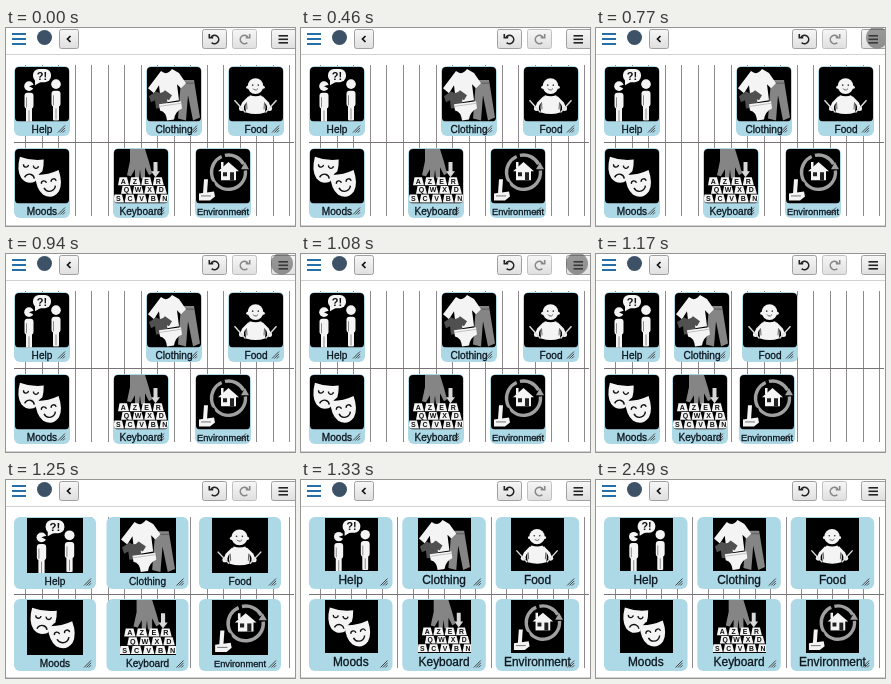
Animation, 289 px wide and 198 px high, one loop 3270 ms. Source, as an HTML page with a canvas:

```html
<!DOCTYPE html>
<html lang="en">
<head>
<meta charset="utf-8">
<title>Communication grid</title>
<style>
html, body { margin: 0; width: 100%; height: 100%; overflow: hidden; background: #fff; }
canvas { display: block; width: 289px; height: 198px; }
</style>
</head>
<body>
<canvas id="stage" width="289" height="198"></canvas>
<script>
const ctx = document.getElementById('stage').getContext('2d');
const LOOP = 3270, TAU = Math.PI * 2;
const FONT = '"Liberation Sans", Arial, sans-serif';
const WHITE = '#f4f4f4', GRAY = '#858585', DARK = '#505050', INK = '#0c1720';

// Layout states: card lefts per row, card box, picture size, label size, grid columns
const small = {
  at: 0, top: [8, 140, 222], low: [8, 107, 189], y: 38, w: 56, h: 70,
  pic: 54, picH: 54.5, font: 10.1, fit: .92, base: 67, cols: 17
};
const even = [8, 101.3, 194.7];
const poses = [
  small,
  { ...small, at: 770, touch: 281 },
  { ...small, at: 940, touch: 276 },
  { ...small, at: 1170, top: [8, 78, 146], low: [8, 76, 143] },
  { ...small, at: 1250, top: [8, 100.5, 193], low: [8, 100.5, 193], y: 37, w: 82, h: 72, pic: 56, picH: 55, base: 68 },
  { at: 1330, top: even, low: even, y: 37, w: 83.5, h: 72, pic: 53, picH: 53, font: 11.9, fit: 1, base: 67, cols: 18 }
];

function poly(points, fill) {
  ctx.beginPath();
  points.forEach(([x, y]) => ctx.lineTo(x, y));
  ctx.closePath();
  ctx.fillStyle = fill;
  ctx.fill();
}
function line(points, color, width = 1) {
  ctx.beginPath();
  points.forEach(([x, y]) => ctx.lineTo(x, y));
  ctx.strokeStyle = color;
  ctx.lineWidth = width;
  ctx.stroke();
}
function disc(x, y, r, fill) {
  ctx.beginPath();
  ctx.arc(x, y, r, 0, TAU);
  ctx.fillStyle = fill;
  ctx.fill();
}
function arc(x, y, r, a, b, color, width) {
  ctx.beginPath();
  ctx.arc(x, y, r, a, b);
  ctx.strokeStyle = color;
  ctx.lineWidth = width;
  ctx.stroke();
}
function box(x, y, w, h, r, fill, stroke) {
  ctx.beginPath();
  ctx.roundRect(x, y, w, h, r);
  ctx.fillStyle = fill;
  ctx.fill();
  if (stroke) {
    ctx.strokeStyle = stroke;
    ctx.lineWidth = 1;
    ctx.stroke();
  }
}
function label(text, x, y, size, weight = 'bold', color = '#111') {
  ctx.font = `${weight} ${size}px ${FONT}`;
  ctx.textAlign = 'center';
  ctx.fillStyle = color;
  ctx.fillText(text, x, y);
}
function shape(path, fill) {
  ctx.fillStyle = fill;
  ctx.fill(new Path2D(path));
}

// Pictograms on a 54 x 54 field
function person(x, y) {
  disc(x, y, 4.8, WHITE);
  box(x - 4.5, y + 6.5, 9, 16, 3, WHITE);
  box(x - 3, y + 18, 6, 18, 1, WHITE);
  line([[x - 2.5, y + 11], [x - 2.5, y + 21]], '#444', .6);
  line([[x, y + 24], [x, y + 35]], '#444', .6);
}
function help() {
  person(14, 19);
  poly([[14, 19], [20, 17], [20, 22]], '#000');
  person(41, 17);
  box(18, 2, 18, 13, 6, WHITE);
  poly([[20, 12], [27, 14], [20, 18]], WHITE);
  label('?!', 27, 12.5, 11);
}

function clothing() {
  poly([[34, 13], [47, 13], [53, 50], [46, 53], [41, 28], [39, 53], [31, 51]], GRAY);
  line([[34, 16], [47, 16]], DARK, .8);
  shape('M14 4 Q20 9 25 2 L32 6 L39 16 L34 21 L30 17 L32 33 L14 36 L12 18 L7 26 L1 21 Z', WHITE);
  shape('M9 24 Q14 28 18 23 L25 28 L22 33 L20 32 L21 40 L9 41 L8 33 L4 35 L2 29 Z', DARK);
  shape('M12 37 L34 34 L35 41 Q28 44 27 52 L20 53 Q19 44 13 43 Z', WHITE);
  line([[12.5, 39], [34, 36]], '#aaa', .7);
}

function food() {
  disc(26.5, 19, 7.8, WHITE);
  disc(18.7, 20, 1.5, WHITE);
  disc(34.3, 20, 1.5, WHITE);
  disc(23.7, 18, .8, '#333');
  disc(29.3, 18, .8, '#333');
  arc(26.5, 20, 2.8, .5, 2.6, '#444', .8);
  shape('M21 28 Q27 30 32 28 Q38 34 36 45 Q27 48 17 45 Q15 34 21 28 Z', WHITE);
  for (const s of [-1, 1]) {
    const at = (dx, y) => [26.5 + s * dx, y];
    line([at(6, 30), at(12, 36), at(14, 41)], WHITE, 3.2);
    disc(...at(14, 41), 2.5, WHITE);
    line([at(10, 45), at(21, 33)], '#ddd', 1.4);
    line([at(9, 35), at(8.5, 42)], '#444', .8);
  }
}

function mask(x, y, tilt, happy) {
  ctx.save();
  ctx.translate(x, y);
  ctx.rotate(tilt);
  shape('M-12 -11 Q0 -8 12 -11 Q14 3 8 10 Q0 17 -8 10 Q-14 3 -12 -11 Z', WHITE);
  for (const s of [-1, 1]) {
    if (happy) arc(s * 5, -1, 2.5, Math.PI, TAU, '#111', 1.3);
    else arc(s * 5, -4, 2.5, 0, Math.PI, '#111', 1.3);
  }
  if (happy) arc(0, 2, 6, .25, Math.PI - .25, '#111', 1.4);
  else arc(0, 10, 5, Math.PI + .25, TAU - .25, '#111', 1.4);
  ctx.restore();
}
function moods() {
  mask(15.5, 20, .12, false);
  disc(34, 34, 13.5, '#000');
  mask(34, 34, -.2, true);
}

function keyboard() {
  shape('M16 0 L31 0 L35 13 L38 24 L35 26 L31 18 L31 29 L27 29 L26 20 L25 30 L21 30 L21 20 L17 27 L13 26 L16 12 Z', GRAY);
  line([[41.5, 13], [41.5, 23]], '#d8d8d8', 4);
  poly([[37, 22], [46, 22], [41.5, 28]], '#d8d8d8');
  ['AZER', 'QWXD', 'SCVBN'].forEach((row, r) => {
    const y = 28 + r * 8.6, step = 11.6;
    [...row].forEach((ch, i) => {
      const x = [4, 7, -1][r] + i * step;
      poly([[x + 1.5, y], [x + 9, y], [x + 11, y + 7.8], [x, y + 7.8]], WHITE);
      label(ch, x + 5.4, y + 6.4, 7);
    });
  });
}

function environment() {
  arc(32.5, 23, 17, -.1, 4.3, '#a0a0a0', 3.4);
  arc(32.5, 23, 17, 4.5, 5.8, '#a0a0a0', 3.4);
  poly([[45, 20], [53, 20], [49, 13]], '#a0a0a0');
  poly([[22, 22], [32.5, 13], [43, 22]], WHITE);
  box(25, 21, 15, 10, 0, WHITE);
  box(25, 13, 2.5, 6, 0, WHITE);
  box(27, 23, 4, 4, 0, '#222');
  box(34, 23, 4, 8, 0, '#222');
  box(2, 32, 17, 20, 4, '#000');
  poly([[8, 30], [12, 30], [11, 44], [7, 44]], WHITE);
  poly([[3, 44], [18, 42], [19, 47], [14, 51], [3, 51]], WHITE);
  line([[5, 46.5], [15, 46.5]], '#555', .8);
}

const rows = [
  { key: 'top', dy: 0, items: [['Help', help], ['Clothing', clothing], ['Food', food]] },
  { key: 'low', dy: 82, items: [['Moods', moods], ['Keyboard', keyboard], ['Environment', environment]] }
];

function card(x, y, name, draw, p) {
  const mid = x + p.w / 2;
  const size = p.font * (name === 'Environment' ? p.fit : 1);
  box(x, y, p.w, p.h, 6, '#add8e6');
  ctx.save();
  ctx.translate(Math.ceil(mid - p.pic / 2), y + 1);
  ctx.beginPath();
  ctx.roundRect(0, 0, p.pic, p.picH, p.w < 60 ? 4 : 0);
  ctx.clip();
  ctx.fillStyle = '#000';
  ctx.fillRect(0, 0, p.pic, p.picH);
  ctx.scale(p.pic / 54, p.picH / 54);
  draw();
  ctx.restore();
  label(name, mid, y + p.base, size, 'normal', INK);
  ctx.strokeStyle = INK;
  ctx.lineWidth = .3;
  ctx.strokeText(name, mid, y + p.base);
  const rx = x + p.w - 5, ry = y + p.h - 3.5;
  for (const d of [7, 4.6, 2.2]) line([[rx - d, ry], [rx, ry - d]], '#333', .9);
}

function gridLines(cols) {
  for (let i = 1; i <= cols; i++) {
    const x = Math.round(3 + i * 280 / cols) + .5;
    line([[x, 37], [x, 188]], '#8d898d');
  }
  line([[8, 114.5], [288, 114.5]], '#777377');
}

function turnArrow(x, dir, color) {
  ctx.save();
  ctx.translate(x, 11);
  ctx.scale(dir, 1);
  arc(.5, .5, 4.2, -2.5, 2.3, color, 1.6);
  line([[-4.7, -5], [-4.7, -1.3], [-.8, -1.3]], color, 1.6);
  ctx.restore();
}

const face = ctx.createLinearGradient(0, 2, 0, 20);
face.addColorStop(0, '#f6f6f6');
face.addColorStop(1, '#e0e0e0');

function header(touch) {
  for (const y of [5, 10, 15]) box(6, y, 14, 2, 0, '#266fa8');
  disc(38.5, 9.5, 7.5, '#3d5266');
  box(53.5, 1.5, 19, 19, 2, face, '#a0a0a0');
  line([[64.5, 8], [61.5, 11], [64.5, 14]], '#111', 1.7);
  box(196.5, 1.5, 24, 19, 2, face, '#a0a0a0');
  turnArrow(208, 1, '#222');
  box(226.5, 1.5, 24, 19, 2, face, '#c0c0c0');
  turnArrow(239, -1, '#888');
  box(265.5, 1.5, 26, 19, 2, face, '#a0a0a0');
  for (const y of [7, 10.5, 14]) box(272.5, y, 9.5, 1.6, 0, '#222');
  if (touch) disc(touch, 9.5, 11, 'rgba(75,75,75,.55)');
  line([[0, 26.5], [289, 26.5]], '#d2d2d2');
  line([[0, 197.5], [289, 197.5]], '#d2d2d2');
}

function render(now) {
  const t = now % LOOP;
  const p = poses.findLast(s => s.at <= t) || small;
  ctx.fillStyle = '#fff';
  ctx.fillRect(0, 0, 289, 198);
  header(p.touch);
  gridLines(p.cols);
  for (const row of rows) {
    row.items.forEach(([name, draw], i) => card(p[row.key][i], p.y + row.dy, name, draw, p));
  }
}

const start = performance.now();
function tick() {
  render(performance.now() - start);
  requestAnimationFrame(tick);
}
tick();
</script>
</body>
</html>
```
